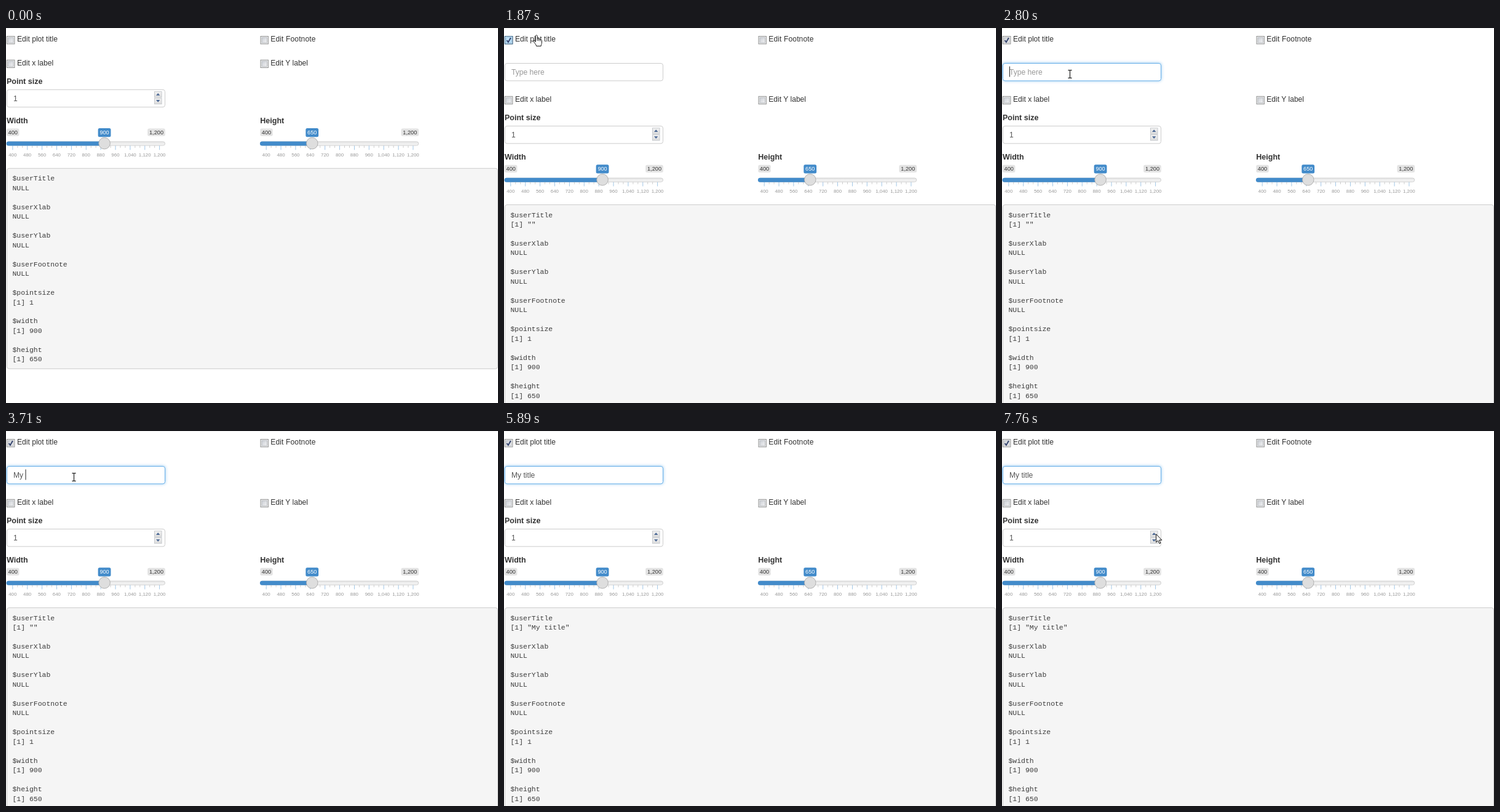
Write an HTML page that moves like this. It is 800 px wide and 610 px high and loops after 8000 ms.

```html
<!DOCTYPE html>
<html lang="en">
<head>
<meta charset="utf-8">
<title>Plot settings form</title>
<style>
html, body { margin: 0; width: 100%; height: 100%; overflow: hidden; background: #fff; }
svg { display: block; width: 800px; height: 610px; }
text { font-family: "Liberation Sans", Arial, sans-serif; font-size: 12.1px; fill: #333; white-space: pre; }
.bold { font-size: 12.5px; font-weight: bold; }
.field { fill: #555; }
.hint { fill: #999; }
.tag { font-size: 9.2px; text-anchor: middle; }
.grid { font-size: 7.9px; fill: #999; text-anchor: middle; }
.code text { font-family: "Liberation Mono", "Courier New", monospace; font-size: 11.45px; fill: #3c3c3c; }
</style>
</head>
<body>
<svg id="stage" viewBox="0 0 800 610" xmlns="http://www.w3.org/2000/svg"></svg>
<script>
const LOOP = 8000;
const SHIFT = 59.2;

const rect = (x, y, w, h, fill, more = '') =>
  `<rect x="${x}" y="${y}" width="${w}" height="${h}" fill="${fill}" ${more}/>`;
const text = (x, y, s, cls = '', more = '') =>
  `<text x="${x}" y="${y}" class="${cls}" ${more}>${s}</text>`;

function checkbox(x, y) {
  return rect(x + .5, y + .5, 12.4, 12.4, '#f6f6f6', 'stroke="#8e8f8f"') +
    rect(x + 2.5, y + 2.5, 8.4, 8.4, 'url(#box)', 'stroke="#b4b8bd" stroke-width=".9"');
}

function inputBox(y, id = '') {
  return rect(1.5, y + .5, 257, 28.4, '#fff', `rx="3.5" stroke="#ccc" ${id}`);
}

function spinButton(y, dir) {
  const tip = y + 5 - 2 * dir, base = y + 5 + 1.8 * dir;
  return rect(241.5, y + .5, 11.6, 9.4, 'url(#button)', 'stroke="#c3c6ca" stroke-width=".9"') +
    `<path d="M244 ${base}H250.4L247.2 ${tip}Z" fill="#4a6794"/>`;
}

function slider(x, name, value, label) {
  const at = x + 9.8 + (value - 400) / 800 * 238.8;
  let s = text(x, 154.5, name, 'bold');
  s += rect(x, 163.6, 20.4, 12.2, '#e3e3e3', 'rx="2.5"') + text(x + 10.2, 173, '400', 'tag');
  s += rect(x + 229.2, 163.6, 28.6, 12.2, '#e3e3e3', 'rx="2.5"') + text(x + 243.5, 173, '1,200', 'tag');
  s += rect(x + .5, 184.9, 257, 6.2, 'url(#track)', 'rx="3.1" stroke="#ccc" stroke-width=".9"');
  s += `<path d="M${at} 184.5H${x + 3}a3.4 3.5 0 0 0 0 7H${at}Z" fill="#428bca"/>`;
  for (let i = 0; i <= 30; i++) {
    const big = i % 3 === 0;
    s += rect(x + 9.4 + i * 7.96, 191.5, .9, big ? 6.8 : 3.4, big ? '#428bca' : '#999', 'opacity=".55"');
    if (big) {
      const n = 400 + i / 3 * 80;
      s += text(x + 9.8 + i * 7.96, 208.7, n.toLocaleString('en-US'), 'grid');
    }
  }
  s += rect(at - 10.4, 163, 20.8, 14.2, '#428bca', 'rx="2.5"') + text(at, 173.3, label, 'tag', 'style="fill:#fff"');
  return s + `<circle cx="${at}" cy="187.6" r="9.3" fill="#dedede" stroke="#aaa" stroke-width=".9"/>`;
}

function output() {
  const items = [['userTitle', 'NULL'], ['userXlab', 'NULL'], ['userYlab', 'NULL'],
    ['userFootnote', 'NULL'], ['pointsize', '[1] 1'], ['width', '[1] 900'], ['height', '[1] 650']];
  const lines = items.map(([name, value], i) => {
    const y = 248.4 + i * 46.41;
    return text(10.5, y, '$' + name) + text(10.5, y + 15.47, value, '', i ? '' : 'id="result"');
  });
  return rect(1.5, 228.3, 798, 326, '#f5f5f5', 'rx="3.5" stroke="#ccc"') +
    `<g id="code" class="code">${lines.join('')}</g>`;
}

const check = '<path d="M4.6 20l2.3 2.9 4-6.8" fill="none" stroke="#36456f" stroke-width="2"/>';

const cursors = `
<g id="arrow"><path d="M.6 .8V14L3.6 11.2 5.9 16.2 7.9 15.3 5.7 10.4H9.9Z" fill="#fff" stroke="#111" stroke-width="1"/></g>
<g id="hand"><path d="M4.2 11.6V2.2C4.2 .1 7.2 .1 7.2 2.2V7C7.5 5.8 9.7 6 9.7 7.4 10.3 6.4 12 6.8 12.1 8.2
  12.9 7.5 14.4 8 14.4 9.4V13.2C14.4 15 13.2 15.8 13.2 18.4H5.6C5.4 15.8 2.6 13.6 .9 10.8 .2 9.3 2 8.6 3 9.8Z"
  fill="#fff" stroke="#111" stroke-width="1"/><path d="M7.2 7V10M9.7 7.4V10.2M12.1 8.2V10.5" stroke="#111" stroke-width=".9"/></g>
<g id="beam"><path d="M.5 .6H2.6L3.5 1.3 4.4 .6H6.5M.5 13.4H2.6L3.5 12.7 4.4 13.4H6.5M3.5 1V13" fill="none" stroke="#111" stroke-width="1.1"/></g>`;

const gradient = (id, from, to, dir) =>
  `<linearGradient id="${id}" x1="0" y1="0" ${dir}><stop stop-color="${from}"/><stop offset="1" stop-color="${to}"/></linearGradient>`;

const stage = document.getElementById('stage');
stage.innerHTML = `<defs>
${gradient('box', '#cbcfd5', '#f2f2f3', 'x2="1" y2="1"')}
${gradient('track', '#e6e6e6', '#f6f6f6', 'x2="0" y2="1"')}
${gradient('button', '#f3f3f3', '#dcdcdc', 'x2="0" y2="1"')}
<filter id="blur" x="-10%" y="-50%" width="120%" height="200%"><feGaussianBlur stdDeviation="2.6"/></filter>
</defs>` +
  rect(0, 0, 800, 610, '#fff') + rect(0, 0, 800, 1, '#f3f3f3') +
  checkbox(1, 13) +
  '<g id="hover">' + rect(1.5, 13.5, 12.4, 12.4, '#e3f2fb', 'stroke="#2f628b"') +
    rect(3.5, 15.5, 8.4, 8.4, '#c4e3f8', 'stroke="#7fb6dc" stroke-width=".9"') + '</g>' +
  `<g id="check">${check}</g>` +
  text(18, 22.4, 'Edit plot title') +
  checkbox(413.5, 13) + text(430.3, 22.4, 'Edit Footnote', '', 'letter-spacing=".1"') +
  '<g id="entry">' +
    rect(1, 57, 258, 29, '#66afe9', 'id="glow" rx="4" opacity=".75" filter="url(#blur)"') +
    inputBox(57, 'id="frame"') + text(12, 75.6, '', '', 'id="typed"') +
    rect(0, 62.5, 1, 17, '#222', 'id="caret"') + '</g>' +
  '<g id="below">' +
    checkbox(1, 51.6) + text(18, 61, 'Edit x label') +
    checkbox(413.5, 51.6) + text(430.3, 61, 'Edit Y label') +
    text(1, 91, 'Point size', 'bold') +
    inputBox(99.8) + text(12, 118.6, '1', 'field') + spinButton(103, 1) + spinButton(113.8, -1) +
    slider(1, 'Width', 900, '900') + slider(413.3, 'Height', 650, '650') + output() + '</g>' +
  cursors;

const el = {};
stage.querySelectorAll('[id]').forEach(e => el[e.id] = e);

// Each step changes only the named properties, at a hard cut.
const steps = [
  [0, { open: false, hover: 0, focus: false, typed: '', caret: false, result: 'NULL', ink: 1, cursor: null }],
  [300, { cursor: ['arrow', 565, 499] }],
  [930, { cursor: ['arrow', 144, 19] }],
  [1250, { cursor: ['arrow', 68, 7] }],
  [1870, { open: true, hover: 1, result: '[1] ""', cursor: ['hand', 47, 11] }],
  [2170, { hover: .4, cursor: ['beam', 95, 53] }],
  [2800, { hover: 0, focus: true, caret: true, cursor: ['beam', 107, 68] }],
  [3710, { typed: 'My ' }],
  [4020, { ink: .8 }],
  [4640, { typed: 'My title', result: '[1] "My "', ink: 1 }],
  [5590, { caret: false, result: '[1] "My title"' }],
  [5890, { cursor: null }],
  [6520, { caret: true, cursor: ['arrow', 453, 136] }],
  [6840, { caret: false, cursor: ['arrow', 229, 129] }],
  [7450, { caret: true, cursor: ['arrow', 259, 166] }],
  [7760, { caret: false, cursor: ['arrow', 250, 167] }]
];

const show = (e, on) => e.setAttribute('display', on ? 'inline' : 'none');
const setText = (e, s) => { if (e.textContent !== s) e.textContent = s; };

function update(t) {
  const s = {};
  for (const [start, change] of steps) if (t >= start) Object.assign(s, change);

  show(el.check, s.open);
  show(el.entry, s.open);
  show(el.glow, s.focus);
  show(el.caret, s.caret);
  el.hover.setAttribute('opacity', s.hover);
  el.frame.setAttribute('stroke', s.focus ? '#66afe9' : '#ccc');
  el.below.setAttribute('transform', `translate(0 ${s.open ? SHIFT : 0})`);
  el.code.setAttribute('opacity', s.ink);

  setText(el.typed, s.typed || 'Type here');
  el.typed.setAttribute('class', s.typed ? 'field' : 'hint');
  el.caret.setAttribute('x', s.typed === 'My ' ? 31.5 : s.typed ? 49.8 : 12);
  setText(el.result, s.result);

  for (const name of ['arrow', 'hand', 'beam']) {
    const on = s.cursor && s.cursor[0] === name;
    show(el[name], on);
    if (on) el[name].setAttribute('transform', `translate(${s.cursor[1]} ${s.cursor[2]})`);
  }
}

const began = performance.now();
function tick() {
  update((performance.now() - began) % LOOP);
  requestAnimationFrame(tick);
}
tick();
</script>
</body>
</html>
```
